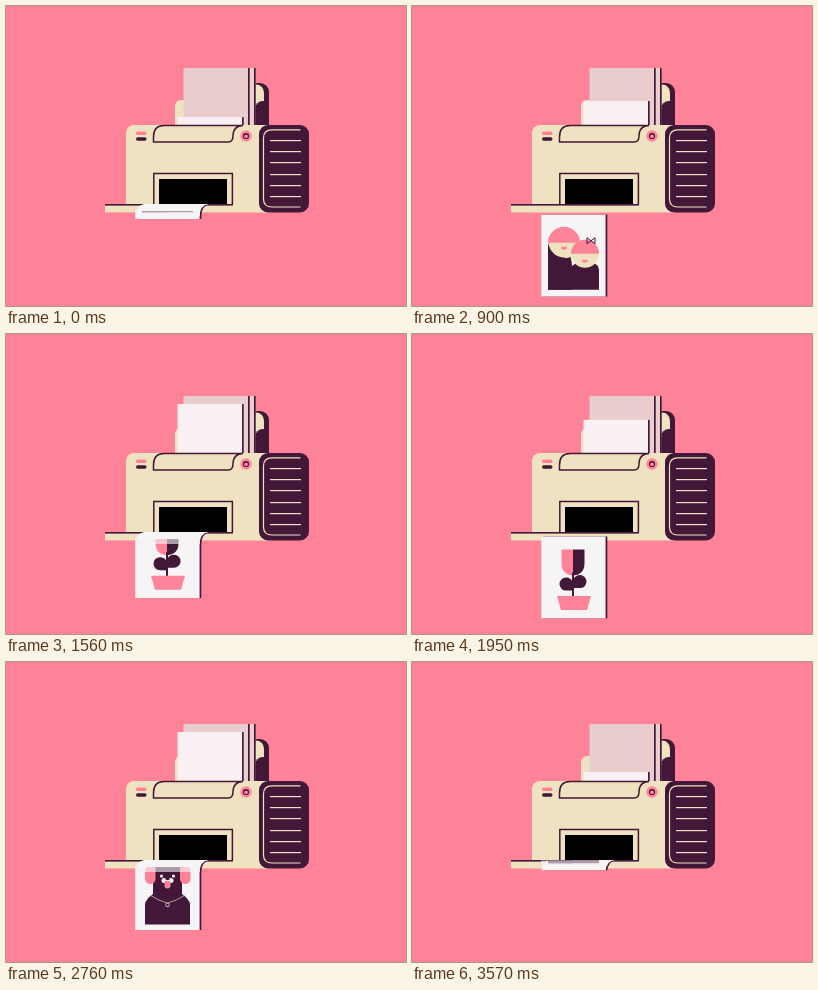
An HTML page with a canvas that plays this animation: 400x300 px, repeating every 3600 ms.

```html
<!DOCTYPE html>
<html>
<head>
<meta charset="utf-8">
<style>
html, body { margin: 0; width: 100%; height: 100%; overflow: hidden; background: #ff8398; }
canvas { display: block; }
</style>
</head>
<body>
<canvas id="stage" width="400" height="300"></canvas>
<script>
const ctx = document.getElementById('stage').getContext('2d');
const PINK = '#ff8398', DARK = '#421737', CREAM = '#efe2c0', WHITE = '#f7f4f5', SHEET = [234, 205, 207];
const LOOP = 3600, CYCLE = 1200, CARD_HEIGHT = 82;

function fill(d, color) {
  ctx.fillStyle = color;
  ctx.fill(new Path2D(d));
}
function stroke(d, color, width = 1.5) {
  ctx.strokeStyle = color;
  ctx.lineWidth = width;
  ctx.stroke(new Path2D(d));
}
function rect(x, y, w, h, color) {
  ctx.fillStyle = color;
  ctx.fillRect(x, y, w, h);
}
function round(x, y, w, h, radii, color) {
  ctx.beginPath();
  ctx.roundRect(x, y, w, h, radii);
  ctx.fillStyle = color;
  ctx.fill();
}
function disc(x, y, r, color, from = 0, to = Math.PI * 2) {
  ctx.beginPath();
  ctx.arc(x, y, r, from, to);
  ctx.fillStyle = color;
  ctx.fill();
}
function clipped(path, draw) {
  ctx.save();
  ctx.clip(path);
  draw();
  ctx.restore();
}
function box(x, y, w, h) {
  const path = new Path2D();
  path.rect(x, y, w, h);
  return path;
}
const mix = (a, b, t) => a + (b - a) * t;
const clamp = t => Math.max(0, Math.min(1, t));
const smooth = t => t * t * (3 - 2 * t);

function track(keys, t) {
  const i = keys.findIndex(k => k[0] > t);
  if (i === 0) return keys[0][1];
  if (i < 0) return keys[keys.length - 1][1];
  const [a, b] = [keys[i - 1], keys[i]];
  return mix(a[1], b[1], (t - a[0]) / (b[0] - a[0]));
}

// Picture coordinates start at the card's top left corner.
function couple() {
  fill('M7 75V32Q8 27 14 27Q30 30 31 52V75Z', DARK);
  disc(23, 28, 15.5, CREAM);
  fill('M7 75V28Q10 42 24 43Q31 48 31 75Z', DARK);
  disc(23, 28, 16, PINK, Math.PI, 0);
  disc(23, 32, 3, PINK, 0, Math.PI);
  fill('M30 75V53Q33 47 44 47Q58 47 58 56V75Z', DARK);
  disc(44, 39, 14, CREAM);
  disc(44, 39, 14, PINK, Math.PI, 0);
  disc(44, 45, 3, PINK, 0, Math.PI);
  stroke('M46 23V29L54 23V29Z', DARK, 1);
}
function plant() {
  fill('M20.5 13H32V39Q20.5 38 20.5 27Z', PINK);
  fill('M32 13H43.5V27Q43.5 38 32 39Z', DARK);
  rect(31, 36, 2, 24, DARK);
  round(18.5, 41, 13.5, 13, [6.5, 6.5, 0, 6.5], DARK);
  round(32, 38.5, 13.5, 13, [6.5, 6.5, 6.5, 0], DARK);
  fill('M16 59.5H50L46 73.5H20Z', PINK);
}
function dog() {
  fill('M10 76.5V56Q11 51 18 46V23Q20 13 32.5 13Q45 13 47 23V46Q54 51 55 56V76.5Z', DARK);
  round(10, 17, 10.5, 19, [7, 3, 5.5, 5.5], PINK);
  round(45, 17, 10.5, 19, [3, 7, 5.5, 5.5], PINK);
  disc(26.5, 28, 1.6, WHITE);
  disc(38.5, 28, 1.6, WHITE);
  round(26.5, 30, 12, 5, 2.5, WHITE);
  disc(32.5, 30, 2.3, DARK);
  round(29.5, 33, 6, 7.5, [0, 0, 3, 3], PINK);
  stroke('M15 47Q24 53 32.5 55Q41 53 50 47', '#d8b5bb', 0.8);
  disc(32.5, 57, 2.2, '#d8b5bb');
  disc(32.5, 57, 1.3, DARK);
}

const cards = [
  { picture: couple, lead: 0 },
  { picture: plant, lead: 30 },
  { picture: dog, lead: 60 }
];
const exitKeys = [[-150, 199], [-90, 203], [-30, 208], [0, 213], [390, 264], [420, 268], [540, 274], [860, 288]];
const feedKeys = [[300, 62], [330, 67], [360, 70], [390, 72], [450, 74], [540, 76], [840, 90],
  [900, 95], [1050, 100], [1170, 110], [1200, 111], [1260, 120]];

function drawCard(picture, t) {
  const fall = Math.max(0, t - 860);
  const bottom = track(exitKeys, t) + 0.00165 * fall * fall;
  const top = bottom - CARD_HEIGHT;
  if (top > 300) return;
  const onTray = top < 198;
  const paper = onTray
    ? new Path2D(`M138 198Q129.3 200 129.3 211V${Math.max(bottom, 211)}H193.6V211Q193.6 199 203 198Z`)
    : box(129.3, top, 64.3, CARD_HEIGHT);
  const drawPicture = () => {
    ctx.save();
    ctx.translate(129, top);
    picture();
    ctx.restore();
  };

  clipped(box(0, 198, 400, bottom - 198), () => {
    ctx.save();
    ctx.translate(1.7, 0);
    ctx.fillStyle = DARK;
    ctx.fill(paper);
    ctx.restore();
    ctx.fillStyle = WHITE;
    ctx.fill(paper);
    if (!onTray) return drawPicture();
    // The bend of the paper hides the print above this edge.
    const edge = 198 + 7 * clamp((bottom - 208) / 5);
    clipped(box(129, edge, 65, 300), () => {
      drawPicture();
      rect(129, edge, 65, 5, 'rgba(247,244,245,.6)');
    });
  });
}

function drawSheet(x, y, whiteness) {
  const tint = SHEET.map((c, i) => mix(c, [248, 240, 242][i], whiteness));
  rect(x, y, 66, 120 - y, `rgb(${tint})`);
  rect(x + 64.5, y, 1.7, 120 - y, DARK);
}

function drawFeed(phase) {
  round(247, 77, 16, 43, [0, 9, 0, 0], DARK);
  round(247, 78.5, 11, 30, [0, 8, 0, 0], CREAM);
  round(249, 95, 14, 25, [8, 0, 0, 0], DARK);
  round(169, 94, 80, 26, [6, 0, 0, 0], CREAM);
  const shift = smooth(clamp((phase - 60) / 240));
  const replaced = phase >= 60 && phase < 300;
  drawSheet(183.5, 62, 0);
  if (replaced) {
    drawSheet(mix(183.5, 177.5, shift), 62, 0);
    drawSheet(mix(177.5, 171.5, shift), 62, shift);
  } else {
    drawSheet(177.5, 62, 0);
    const y = track(feedKeys, phase < 60 ? phase + CYCLE : phase);
    if (y < 120) drawSheet(171.5, y, 1);
  }
}

function drawPrinter() {
  round(120, 119, 145, 87.4, [8, 0, 0, 0], CREAM);
  rect(99, 199, 22, 7.4, CREAM);
  stroke('M147.5 136V131Q147.5 119.5 158 119.5H237Q227 120 227 130Q227 136 222 136Z', DARK);
  round(130, 125.5, 10.5, 3.5, 1.75, PINK);
  round(130, 131.3, 10.5, 3.5, 1.75, DARK);
  disc(240, 130, 5.7, PINK);
  disc(240, 130, 3.1, DARK);
  disc(240, 130.3, 1.9, PINK);

  round(253, 119, 50, 87.4, 9, DARK);
  stroke('M294.5 123.8H266Q257.5 123.8 257.5 132V193Q257.5 201 266 201H294.5', CREAM, 1.2);
  for (let i = 0; i < 6; i++) rect(264, 134 + Math.round(i * 11.2), 31, 1.2, CREAM);

  stroke('M147.8 198V167.4H226.4V198.5', DARK);
  rect(153, 173, 68, 25, '#000');
  rect(99, 198, 128, 1.6, DARK);
}

function frame(now) {
  const time = now % LOOP;
  rect(0, 0, 400, 300, PINK);
  drawFeed(time % CYCLE);
  drawPrinter();
  cards.forEach(({ picture, lead }, i) => {
    let t = (time - i * CYCLE + lead + LOOP) % LOOP;
    if (t > LOOP - 150) t -= LOOP;
    drawCard(picture, t);
  });
  requestAnimationFrame(frame);
}
requestAnimationFrame(frame);
</script>
</body>
</html>
```
